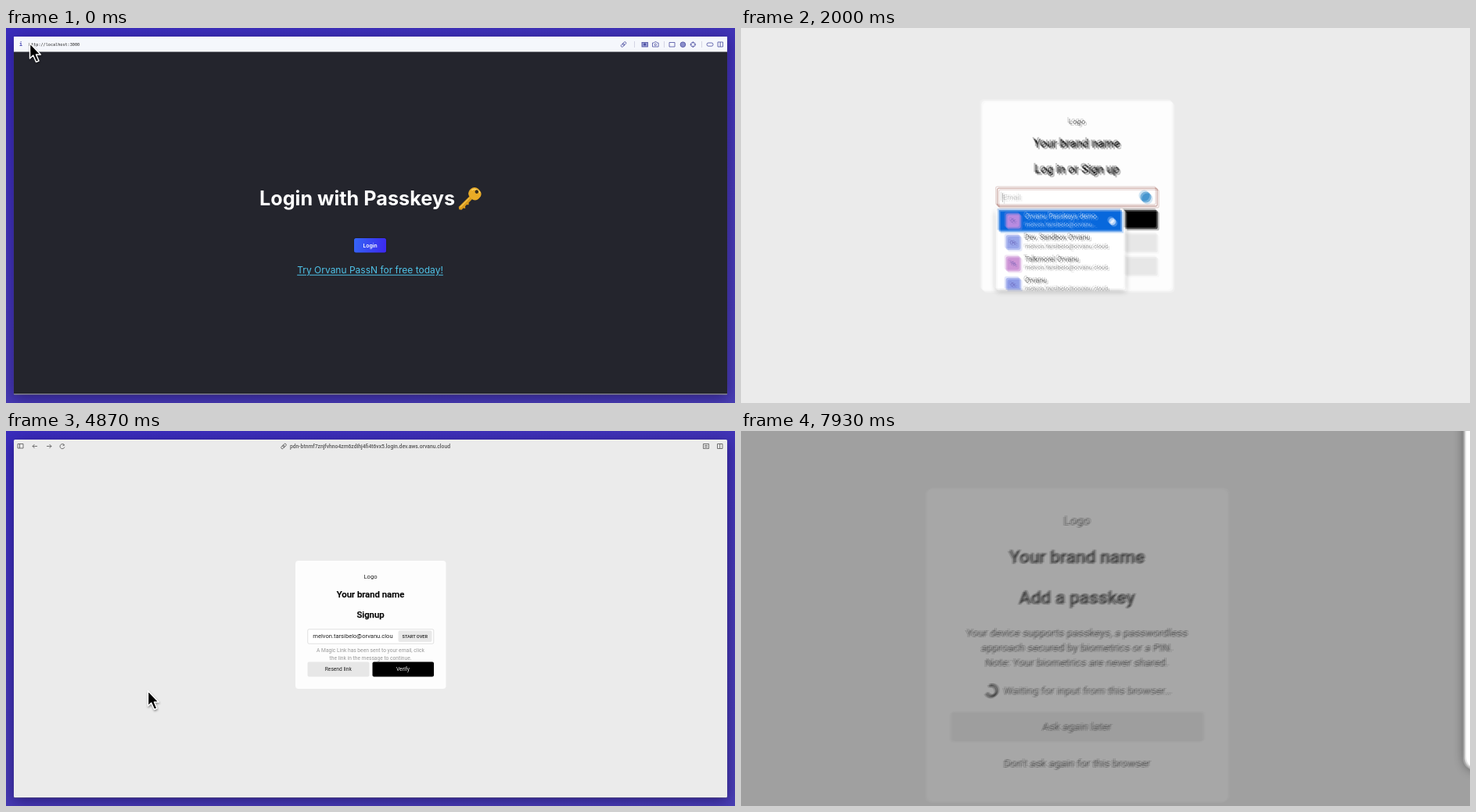
An HTML page for the animation above (8 s loop, 932 by 480 pixels).

```html
<!DOCTYPE html>
<html lang="en">
<head>
<meta charset="utf-8">
<title>Passkey login</title>
<style>
html, body { margin: 0; width: 100%; height: 100%; overflow: hidden; background: #4034b6; }
#stage { position: relative; width: 932px; height: 480px; overflow: hidden; font-family: Roboto, sans-serif; }
#lens { position: absolute; inset: 0; }
#filters { position: absolute; width: 0; height: 0; }
.world { position: absolute; left: 0; top: 0; width: 1864px; height: 960px; transform-origin: 0 0; }
.world div, .world svg { position: absolute; box-sizing: border-box; }
.text { white-space: pre; line-height: 1; }
.mono { font-family: "DejaVu Sans Mono", monospace; }
.world svg { left: 0; top: 0; overflow: visible; }
#desk { inset: 0; background: linear-gradient(165deg, #3a2cbc, #4639b2 60%, #4a3fb4); }
#window { left: 20px; top: 22px; width: 1824px; height: 916px; background: #ebebeb; border-radius: 3px;
  box-shadow: 0 8px 34px rgba(18, 6, 80, .55), 0 1px 2px #888; }
#home { left: 20px; top: 22px; width: 1824px; height: 916px; background: #24252d; border-bottom: 2px solid #8c8c98; }
.card { background: #fdfdfd; border-radius: 8px; left: 739.5px; width: 385px; }
.head { -webkit-text-stroke: .5px; font-weight: 500; }
#dim { left: 20px; top: 22px; width: 1824px; height: 916px; background: rgba(110, 110, 110, .6); }
#popup { left: 1426px; top: 72px; width: 398px; height: 583px; border-radius: 16px; background: #fff;
  box-shadow: 0 0 14px rgba(0, 0, 0, .5); }
#cursor svg { filter: drop-shadow(1px 3px 2px rgba(0, 0, 0, .4)); }
</style>
</head>
<body>
<div id="stage">
  <svg id="filters"><filter id="smear" x="-5%" y="-5%" width="110%" height="110%" color-interpolation-filters="sRGB">
    <feOffset id="wide1" in="SourceGraphic" result="a"/><feOffset id="wide2" in="SourceGraphic" result="b"/>
    <feComposite in="a" in2="b" operator="arithmetic" k2=".5" k3=".5" result="pair"/>
    <feOffset id="near1" in="pair" result="c"/><feOffset id="near2" in="pair" result="d"/>
    <feComposite in="c" in2="d" operator="arithmetic" k2=".5" k3=".5"/>
  </filter></svg>
  <div id="lens"><div class="world" id="page"></div></div>
  <div class="world" id="pointer"><div id="cursor">
    <svg id="arrow" width="40" height="56"><path d="M1 1V40L9.5 32L17 49L24 46L17 30H28.5Z" stroke="#fff" stroke-width="3" stroke-linejoin="round"/></svg>
    <svg id="hand" width="44" height="52" style="left:-11px" fill="#fff" stroke="#000" stroke-width="2.4" stroke-linejoin="round" stroke-linecap="round">
      <path d="M7 5C7 0 15.5 0 15.5 5V15C18 12 23 13 23.5 16C27 14 31 15 31.5 19C35 17 40 18 40 23C41 32 36 35 35 45H16C15 39 4 32 1 25C0 20 6 20 8 24Z"/>
      <path d="M20 26V36M26 26V36M32 26V36"/></svg>
  </div></div>
</div>
<script>
const $ = id => document.getElementById(id);
const LOOP = 8000, SHUTTER = 8;
const BRAND = 'Orvanu', EMAIL = 'melvon.tarsibelo@orvanu.cloud';

// Page coordinates are twice the size of the unzoomed stage.
const box = (x, y, w, h, css = '', inner = '', id = '') =>
  `<div ${id && `id="${id}"`} style="left:${x}px;top:${y}px;width:${w}px;height:${h}px;${css}">${inner}</div>`;
const text = (x, y, str, size, css = '', cls = '', shift = -50) =>
  `<div class="text ${cls}" style="left:${x}px;top:${y}px;font-size:${size}px;transform:translate(${shift}%,-50%);${css}">${str}</div>`;
const left = (x, y, str, size, css, cls = '') => text(x, y, str, size, css, cls, 0);
const button = (x, y, w, label, dark) =>
  box(x, y, w, 38, `border-radius:4px;background:${dark ? '#000' : '#e7e7e7'};color:${dark ? '#f2f2f2' : '#222'}`,
    text(w / 2, 19, label, 13.35));
const card = (id, height, inner) =>
  `<div class="card" id="${id}" style="top:${496 - height / 2}px;height:${height}px">` +
  text(192.5, 42, 'Logo', 15.2, 'color:#222') + text(192.5, 88, 'Your brand name', 22.7, '', 'head') + inner + '</div>';
const title = str => text(192.5, 140, str, 22.7, '', 'head');
const lines = (y, rows, color = '#111') =>
  rows.map((row, i) => text(192.5, y + i * 19.1, row, 13.35, `color:${color}`)).join('');
const field = (border, inner) =>
  box(31, 175, 323, 38, `border:${border};border-radius:4px;background:#fff`, inner);
const icons = (color, paths) =>
  `<svg width="1864" height="960" viewBox="0 0 932 480" fill="none" stroke="${color}" stroke-width=".8">${paths}</svg>`;
const path = d => `<path d="${d}"/>`;
const link = (x, y) => `<g transform="translate(${x} ${y}) rotate(-45)"><rect x="-4" y="-1.5" width="5" height="3" rx="1.5"/><rect x="-1" y="-1.5" width="5" height="3" rx="1.5"/></g>`;

const lightBar = icons('#555', path('M15 16.5h7v5.5h-7zM17.5 16.5v5.5M40 19.5h-6m2.5-2.5l-2.5 2.5l2.5 2.5M52 19.5h6m-2.5-2.5l2.5 2.5l-2.5 2.5M74.5 18a3 3 0 1 0 .4 2.5M73 16.5l1.6 1.6l-2 .6')
  + link(355, 19.5) + path('M891.5 16.5h7v6h-7zM893 18.5h4M893 20.5h4M909.5 16.5h6.5v6h-6.5zM912.7 16.5v6'))
  + text(931, 39, `pdn-btnmf7znjfvhno4zm6zdihj4fi4t6vx5.login.dev.aws.${BRAND.toLowerCase()}.cloud`, 13.5, 'color:#555;font-weight:500');

const darkBar = box(0, 0, 1824, 39, 'background:#f5f7fc')
  + left(14, 20, 'i', 13, 'color:#3d3fae;font-weight:700', 'mono')
  + left(38, 20, 'http://localhost:3000', 10.3, 'color:#222', 'mono');
const barIcons = icons('#4a4da0', link(789.5, 21)
  + '<rect x="813" y="18.5" width="7.5" height="5.5" fill="#9a9ed4"/><circle cx="816.7" cy="21" r="1.2" fill="#4a4da0"/>'
  + path('M826.5 19h2l1-1.2h2l1 1.2h1.6v5h-7.6zM848 18.5h7v5.5h-7zM862 21.2h7M865.4 18v6.5M874.5 21.2h2.5M879.6 21.2h2.5M878.3 17.4v2.5M878.3 22.5v2.5M910 18h6.5v6h-6.5zM913.2 18v6')
  + '<circle cx="830.3" cy="21.4" r="1.2"/><circle cx="865.4" cy="21.2" r="3.3" fill="#8a8ecb"/><circle cx="878.3" cy="21.2" r="2.9"/><rect x="896" y="19" width="8" height="4.2" rx="2"/>'
  + '<path d="M803.5 17v8M841.5 17v8M889.5 17v8" stroke="#ccd"/>');
const key = `<svg width="1864" height="960" viewBox="0 0 932 480">
  <g transform="translate(599 212.5) rotate(45)"><path d="M-2.6 6V26L0 28L2.6 26V23L4.8 21.5L2.6 19.5V17L4.5 15L2.6 13V6Z" fill="#d99a1c"/>
  <path d="M-1 8V25" stroke="#f4c64e" stroke-width="1.2"/>
  <rect x="-8" y="-8" width="16" height="15" rx="6.5" fill="#e9ab26"/><path d="M-6 -1C-5 -6 0 -7 4 -6" stroke="#f9d56c" fill="none" stroke-width="1.4"/>
  <circle cy="-4" r="2.3" fill="#3a2c18"/></g></svg>`;

const home = `<div id="home">${darkBar}
  ${text(878, 414, 'Login with Passkeys', 50.4, 'color:#fff;font-family:Inter,sans-serif;font-weight:700')}
  ${box(870, 516, 82, 37, 'border-radius:5px;background:linear-gradient(100deg,#3566f6,#3c27ee);box-shadow:0 0 3px #111',
    text(41, 18.5, 'Login', 13.6, 'color:#fff;font-family:Inter,sans-serif;font-weight:600'))}
  ${text(911, 598, `Try ${BRAND} PassN for free today!`, 24, 'color:#4fc3e8;font-family:Inter,sans-serif;text-decoration:underline;text-underline-offset:3px;line-height:1.3')}
  <div style="left:-20px;top:-22px">${barIcons}${key}</div></div>`;

const accounts = [['Orvanu Passkeys demo', '#b98be0'], ['Dev. Sandbox Orvanu', '#98a6ea'], ['Talkmorel Orvanu', '#cd95d6'], ['Orvanu', '#8f9de8']];
const account = ([name, color], i) => {
  const on = i === 0;
  return box(6, i * 43, 247, 43, on ? 'background:#0868dc' : '',
    box(14, 7, 30, 30, `border-radius:5px;background:${color}`, text(15, 15, name.slice(0, 2), 11, 'color:#5a4fa8'))
    + left(53, 13, name, 13.9, `color:${on ? '#fff' : '#222'}`)
    + left(53, 30, on ? EMAIL.slice(0, 23) + '…' : EMAIL, 11.9, `color:${on ? '#dbe8ff' : '#666'}`)
    + (on ? box(221, 16, 14, 14, 'border-radius:7px;background:#e4efff') : ''));
};

$('page').innerHTML = '<div id="desk"></div><div id="window"></div>' + lightBar
  + card('load', 250, '<svg width="385" height="250"><path id="spin" d="M211.6 182.8A20.5 20.5 0 0 1 212.4 187" fill="none" stroke="#444" stroke-width="2.5"/></svg>')
  + card('login', 383, title('Log in or Sign up')
    + field('2px solid #9c5a50', '<div id="empty">' + left(11, 18, 'Email', 14.5, 'color:#a8a8a8') + box(9, 9, 1.5, 18, 'background:#333') + '</div>'
      + `<div id="filled">${left(13, 17.5, EMAIL, 15.2, 'color:#222')}</div>`
      + box(286, 6, 22, 22, 'border-radius:11px;background:#4796cf'))
    + button(31, 220, 323, 'Continue', true) + button(31, 267, 323, 'Log in with a passkey') + button(31, 314, 323, 'Other options')
    + box(29, 220, 260, 160, 'background:#fff;overflow:hidden;border-radius:4px;box-shadow:0 3px 12px rgba(0,0,0,.28)', accounts.map(account).join(''), 'list'))
  + card('signup', 328, title('Signup')
    + field('1.5px solid #c2c2c2', left(13, 17.5, EMAIL.slice(0, -1), 15.2, 'color:#222'))
    + box(263, 179, 86, 29, 'border-radius:4px;background:#e9e9e9', text(43, 14.5, 'START OVER', 11.3, 'font-weight:500;color:#222'))
    + lines(230, ['A Magic Link has been sent to your email, click', 'the link in the message to continue.'], '#999')
    + button(31, 259, 158, 'Resend link') + button(197, 259, 157, 'Verify', true))
  + card('passkey', 400, title('Add a passkey')
    + lines(183.5, ['Your device supports passkeys, a passwordless', 'approach secured by biometrics or a PIN.', 'Note: Your biometrics are never shared.'])
    + `<div id="add">${button(31, 239, 323, 'Add passkey', true)}</div>`
    + `<div id="wait">${left(99, 258, 'Waiting for input from this browser…', 13.35, 'color:#222')}
      <svg width="385" height="300"><path id="wheel" d="M83 251a7 7 0 1 1 -7 7" fill="none" stroke="#111" stroke-width="3.5"/></svg></div>`
    + button(31, 285, 323, 'Ask again later') + lines(351, ["Don't ask again for this browser"]))
  + home + '<div id="dim"></div><div id="popup"></div>';

// time, zoom, shift x, shift y
const camera = [
  [0, 1, 0, 0], [500, 1, 0, 0], [850, 2, -553, -348], [1030, 2, -553, -348], [1422, 1, 0, 0],
  [1860, 1, 0, 0], [2270, 2, -599, -370], [4400, 2, -599, -370], [4800, 1, 0, 0],
  [4900, 1, 0, 0], [5230, 2, -466, -240], [7800, 2, -466, -240], [8400, 2.05, -788, -103]];
// time, x, y on the unzoomed stage
const pointer = [
  [0, 30, 19], [100, 30, 19], [500, 462, 278], [800, 466, 280], [1200, 545, 312], [1420, 500, 290],
  [1650, 440, 215], [2250, 440, 250], [2400, 432, 273], [2650, 432, 273], [2900, 490, 272], [3100, 490, 272],
  [3450, 579.5, 330], [4400, 579.5, 330], [4850, 181, 332], [4900, 181, 332], [5260, 383, 352],
  [5800, 430, 330], [6270, 446.5, 297], [6450, 460, 276], [7000, 460, 276], [7700, 653, 190], [8400, 653, 190]];
// element, shown from, shown until
const shown = [
  ['home', 0, 850], ['load', 850, 1450], ['login', 1450, 3150], ['list', 1600, 2450], ['empty', 0, 2450], ['filled', 2450, LOOP],
  ['signup', 3150, 5400], ['passkey', 5400, LOOP], ['add', 0, 6560], ['wait', 6560, LOOP], ['dim', 6750, LOOP], ['popup', 7000, LOOP]];
const within = (t, spans) => spans.some(([a, b]) => t >= a && t < b);

function sample(keys, t) {
  const i = keys.findIndex(k => k[0] > t);
  const a = keys[i - 1], b = keys[i];
  const p = (t - a[0]) / (b[0] - a[0]), s = p * p * (3 - 2 * p);
  return a.slice(1).map((v, n) => v + (b[n + 1] - v) * s);
}

// Where the middle of the card lies on the stage
function cardCentre(t) {
  const [zoom, dx, dy] = sample(camera, t);
  return [466 * zoom + dx, 248 * zoom + dy];
}

// Four copies spread along the path travelled while the shutter is open
function smear(t) {
  const [x0, y0] = cardCentre(Math.max(0, t - SHUTTER / 2)), [x1, y1] = cardCentre(t + SHUTTER / 2);
  const offset = (id, part) => {
    $(id).setAttribute('dx', (x1 - x0) * part);
    $(id).setAttribute('dy', (y1 - y0) * part);
  };
  offset('wide1', -1 / 3);
  offset('wide2', 1 / 3);
  offset('near1', -1 / 6);
  offset('near2', 1 / 6);
  const moving = Math.hypot(x1 - x0, y1 - y0) > .3;
  $('lens').style.filter = moving ? 'url(#smear) blur(.4px)' : 'none';
}

function draw(t) {
  const [zoom, dx, dy] = sample(camera, t);
  $('page').style.transform = $('pointer').style.transform = `translate(${dx}px,${dy}px) scale(${zoom / 2})`;
  smear(t);

  for (const [id, from, to] of shown) $(id).style.display = within(t, [[from, to]]) ? 'block' : 'none';
  $('dim').style.opacity = Math.min(1, Math.max(0, (t - 6750) / 150));
  $('spin').setAttribute('transform', `rotate(${(t - 1200) * .36 - 35} 192 187)`);
  $('wheel').setAttribute('transform', `rotate(${t * .36} 83 258)`);

  const [x, y] = sample(pointer, t);
  $('cursor').style.transform = `translate(${x * 2}px,${y * 2}px)`;
  $('cursor').style.display = within(t, [[0, 1700], [2250, 7780]]) ? 'block' : 'none';
  const hand = within(t, [[480, 850], [2250, 4400], [5800, 6950]]);
  $('hand').style.display = hand ? 'block' : 'none';
  $('arrow').style.display = hand ? 'none' : 'block';
}

const start = performance.now();
function tick() {
  draw((performance.now() - start) % LOOP);
  requestAnimationFrame(tick);
}
tick();
</script>
</body>
</html>
```
